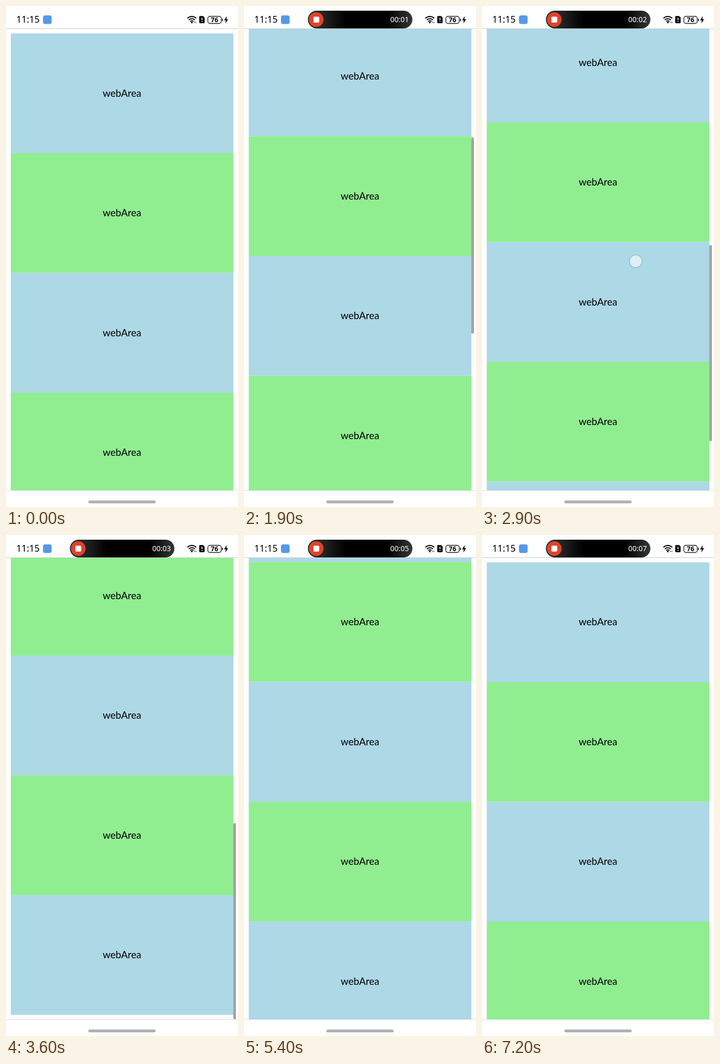
Recreate the animation shown at these times as an HTML page. Size 445 by 960 pixels, loop 7300 ms.

```html
<!DOCTYPE html>
<html lang="en">
<head>
<meta charset="utf-8">
<title>Scrolling web area</title>
<style>
  html, body { margin: 0; width: 100%; height: 100%; overflow: hidden; background: #fefefe; }
  svg { display: block; width: 100%; height: 100%; }
  .status { font: 500 17.5px "Noto Sans", sans-serif; }
  .timer { font: 500 14px "Noto Sans", sans-serif; fill: #fff; text-anchor: middle; }
  .charge { font: 700 12.5px "Noto Sans", sans-serif; text-anchor: middle; }
  .label { font: 400 19px Lato, sans-serif; text-anchor: middle; }
</style>
</head>
<body>
<svg viewBox="0 0 445 960" xmlns="http://www.w3.org/2000/svg">
  <defs>
    <clipPath id="viewport"><rect y="43.5" width="445" height="884.5"/></clipPath>
    <linearGradient id="capsuleFill">
      <stop offset="0" stop-color="#303432"/>
      <stop offset=".16" stop-color="#222"/>
      <stop offset=".36" stop-color="#000"/>
      <stop offset=".76" stop-color="#000"/>
      <stop offset="1" stop-color="#363838"/>
    </linearGradient>
  </defs>
  <rect width="445" height="960" fill="#fefefe"/>

  <g clip-path="url(#viewport)">
    <g id="page"></g>
    <rect id="thumb" x="436" width="5" height="376" rx="2.5" fill="#a3a3a3"/>
    <circle id="finger" r="12" fill="#fff" fill-opacity=".6" stroke="#5f8f8a" stroke-opacity=".4" stroke-width="1.5"/>
  </g>
  <path d="M0 43.5H445" stroke="#c9cbcb"/>
  <path d="M0 928.5H445" stroke="#dde0e0"/>
  <rect x="158" y="947.5" width="129" height="5.5" rx="2.75" fill="#b1b1b1"/>

  <text class="status" x="19.7" y="32">11:15</text>
  <rect x="71" y="18" width="16.5" height="16.5" rx="4" fill="#5599e6"/>

  <g fill="none" stroke="#000" stroke-width="1.9">
    <path d="M348 23.6Q356.5 16.6 365 23.6M350.6 26.7Q356.5 21.7 362.4 26.7M353.2 29.6Q356.5 26.9 359.8 29.6"/>
  </g>
  <circle cx="356.5" cy="31.6" r="1.6"/>
  <path d="M360.3 30.2h2.6l-1.3 2.6zM363 32.4h2.6l-1.3-2.6z" fill="#555"/>
  <path d="M373 19.3h5l3 3v9a1.7 1.7 0 0 1-1.7 1.7h-7a1.7 1.7 0 0 1-1.7-1.7v-10.3a1.7 1.7 0 0 1 2.4-1.7z"/>
  <path d="M375.9 22.5v4.6M375.9 28.7v1.8" stroke="#fff" stroke-width="1.7"/>
  <rect x="387.2" y="19.7" width="25.6" height="13.8" rx="4" fill="none" stroke="#1c201c" stroke-width="1.4"/>
  <text class="charge" x="400" y="31.2">76</text>
  <path d="M415.3 24.3v4.6" stroke="#000" stroke-width="1.6"/>
  <path d="M423.4 19.2L418.3 27.4H421.6L420.8 33.6L426 25.2H422.7Z"/>

  <g id="capsule">
    <rect id="pill" y="9" height="34" rx="17" fill="url(#capsuleFill)"/>
    <g id="capsuleContent">
      <circle cx="138.6" cy="26" r="14" fill="#e0432b"/>
      <rect x="133" y="20.4" width="11.3" height="11.3" rx="2.2" fill="#fff"/>
      <text id="timer" class="timer" x="298.5" y="31"></text>
    </g>
  </g>
</svg>
<script>
const LOOP = 7300, STEP = 100;
const BAND = 229.5, BANDS = 9, TOP = 52.5;
const VIEW_TOP = 43, VIEW = 885, CONTENT = BAND * BANDS + 18;
const END = CONTENT - VIEW;
const el = id => document.getElementById(id);
const clamp = v => Math.min(1, Math.max(0, v));
const show = (node, on) => node.setAttribute('visibility', on ? 'visible' : 'hidden');

el('page').innerHTML = Array.from({ length: BANDS }, (_, i) => {
  const y = TOP + i * BAND;
  return `<rect x="9.2" y="${y}" width="427" height="${BAND}" fill="${i % 2 ? '#90ee90' : '#add8e6'}"/>
    <text class="label" x="222.5" y="${y + 121}">webArea</text>`;
}).join('');

// Two upward flicks: [time, scroll offset]
const flicks = [
  [1150, 0], [1300, 35], [1400, 107.4], [1500, 230], [1600, 320], [1750, 420], [1900, 491.5],
  [2100, 556], [2300, 602], [2600, 650], [2700, 695], [2800, 812], [2900, 977], [3000, 1130], [3100, END]
];

const slope = (a, b) => (b[1] - a[1]) / (b[0] - a[0]);

// Smooth monotone curve through the points
function along(points, t) {
  const last = points.length - 1;
  if (t <= points[0][0]) return points[0][1];
  if (t >= points[last][0]) return points[last][1];
  const i = points.findIndex(p => p[0] > t) - 1;
  const tangent = k => {
    if (k === 0 || k === last) return 0;
    const a = slope(points[k - 1], points[k]), b = slope(points[k], points[k + 1]);
    return 2 * a * b / (a + b);
  };
  const [p, q] = [points[i], points[i + 1]];
  const h = q[0] - p[0], u = (t - p[0]) / h, v = 1 - u;
  return v * v * (1 + 2 * u) * p[1] + u * u * (3 - 2 * u) * q[1]
    + h * u * v * (v * tangent(i) - u * tangent(i + 1));
}

// Critically damped spring back to the top
function scrollAt(t) {
  const x = Math.max(0, t - 5095) / 100;
  return t < 5095 ? along(flicks, t) : END * (1 + x) * Math.exp(-x);
}

function render(t) {
  const scroll = scrollAt(t);
  el('page').setAttribute('transform', `translate(0 ${-scroll})`);

  el('thumb').setAttribute('y', VIEW_TOP + scroll * VIEW / CONTENT);
  show(el('thumb'), t >= 1200 && t < 3800);

  const first = t >= 1200 && t < 1600, second = t >= 2600 && t < 3100;
  el('finger').setAttribute('cx', first ? 257 : 295);
  el('finger').setAttribute('cy', (first ? 817 : 1466) - scroll);
  show(el('finger'), first || second);

  const grow = 1 - (1 - clamp((t - 200) / 500)) ** 3;
  const width = 34 + 166.5 * grow;
  el('pill').setAttribute('x', 222.75 - width / 2);
  el('pill').setAttribute('width', width);
  el('capsule').setAttribute('opacity', clamp((t - 150) / 200));
  el('capsuleContent').setAttribute('opacity', clamp((t - 400) / 300));
  el('timer').textContent = '00:0' + Math.max(0, Math.floor((t - 100) / 1000));
}

const start = performance.now();
function tick() {
  const t = (performance.now() - start) % LOOP;
  render(Math.floor(t / STEP) * STEP);
  requestAnimationFrame(tick);
}
tick();
</script>
</body>
</html>
```
